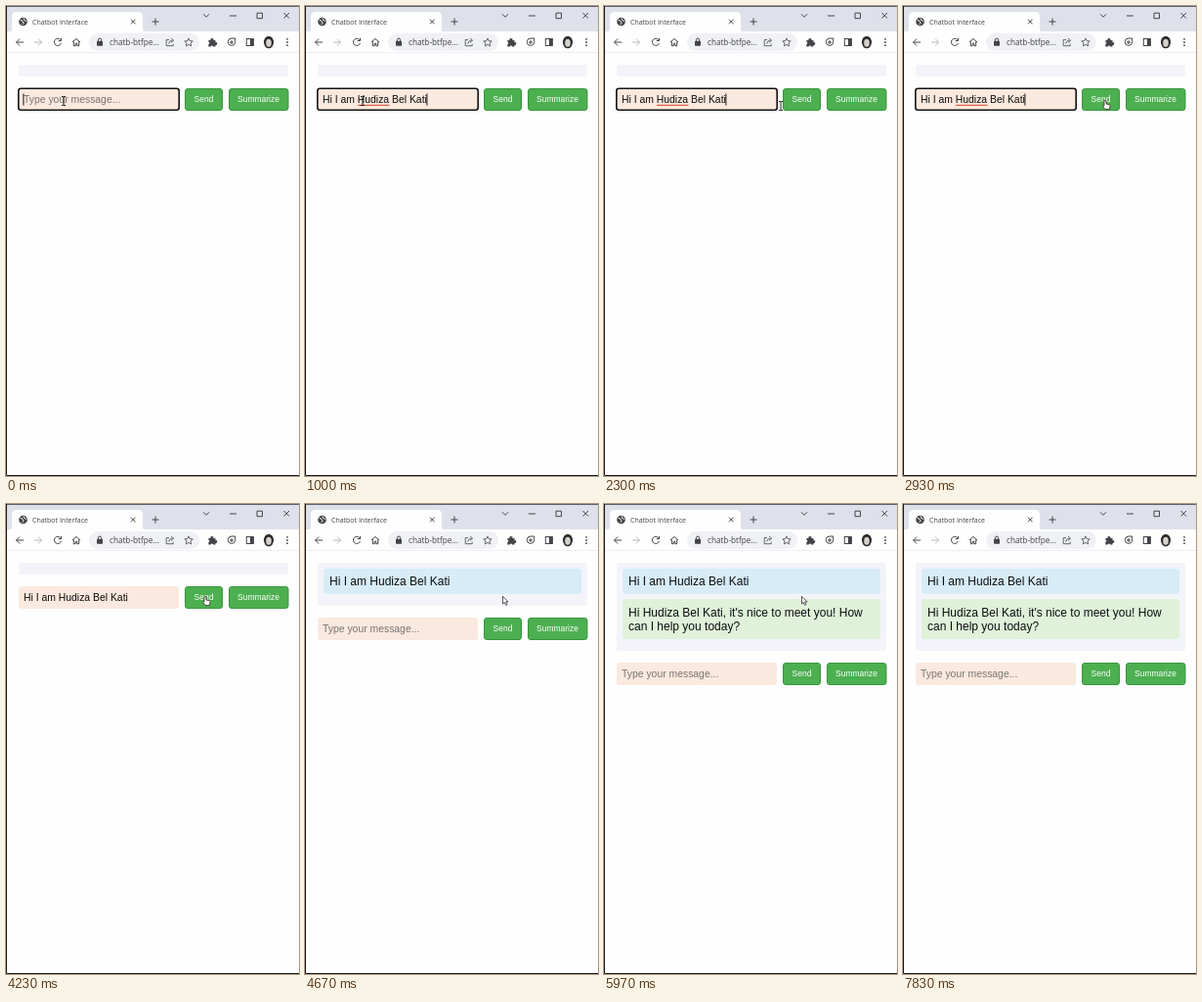
These frames come from a looping animation (300x480 px, 8 s). An HTML page:

```html
<!DOCTYPE html>
<html lang="en">
<head>
<meta charset="utf-8">
<title>Chatbot Interface</title>
<style>
html, body { margin: 0; width: 100%; height: 100%; overflow: hidden; background: #fefefe; }
svg { display: block; }
text { font-family: "Liberation Sans", Arial, sans-serif; white-space: pre; }
.ui { font-family: "Open Sans", sans-serif; fill: #434448; }
.field { font-size: 10.4px; }
.bubble text { font-size: 12px; fill: #0c0e10; }
.button text { font-size: 8.5px; fill: #fff; text-anchor: middle; }
.button rect { fill: #4caf50; stroke: #3a963f; }
.line { fill: none; stroke: #434448; stroke-width: 1; }

/* every part shares one 8 s clock */
.clip { animation: 8s step-end infinite; }
#row { animation-name: row; }
#log { animation-name: log; }
#hint { animation-name: hint; }
#typed { animation-name: typed; }
#focus { animation-name: focus; }
#spell { animation-name: spell; }
#caret { animation-name: caret; }
#sent { animation-name: sent; }
#reply { animation-name: reply; }
#beam { animation-name: beam; }
#hand { animation-name: hand; }
#arrow { animation-name: arrow; }
#mouse { animation: mouse 8s linear infinite; }

@keyframes row {
  0% { transform: translateY(0); }
  58.375% { transform: translateY(32px); }
  73.75%, 100% { transform: translateY(78px); }
}
@keyframes log {
  0% { height: 12px; }
  58.375% { height: 44px; }
  73.75%, 100% { height: 90px; }
}
@keyframes hint { 0% { opacity: 1; } 9.125% { opacity: 0; } 58.375%, 100% { opacity: 1; } }
@keyframes typed { 0% { opacity: 0; } 9.125% { opacity: 1; } 58.375%, 100% { opacity: 0; } }
@keyframes focus { 0% { opacity: 1; } 40%, 100% { opacity: 0; } }
@keyframes spell { 0% { opacity: 0; } 11.625% { opacity: 1; } 40%, 100% { opacity: 0; } }
@keyframes caret {
  0% { opacity: 1; transform: none; }
  2.125% { opacity: 0; transform: none; }
  6.25% { opacity: 1; transform: none; }
  9.125% { opacity: 1; transform: translateX(107px); }
  16% { opacity: 0; transform: translateX(107px); }
  22.875% { opacity: 1; transform: translateX(107px); }
  29.5% { opacity: 0; transform: translateX(107px); }
  36.125% { opacity: 1; transform: translateX(107px); }
  40%, 100% { opacity: 0; transform: translateX(107px); }
}
@keyframes sent { 0% { opacity: 0; } 58.375%, 100% { opacity: 1; } }
@keyframes reply { 0% { opacity: 0; } 73.75%, 100% { opacity: 1; } }
@keyframes beam { 0% { opacity: 1; } 29.2%, 100% { opacity: 0; } }
@keyframes hand { 0% { opacity: 0; } 29.2% { opacity: 1; } 58.375%, 100% { opacity: 0; } }
@keyframes arrow { 0% { opacity: 0; } 58.375% { opacity: 1; } 97.8%, 100% { opacity: 0; } }
@keyframes mouse {
  0%, 21.25% { transform: translate(59px, 97px); animation-timing-function: ease-in; }
  25% { transform: translate(116px, 98px); }
  28.75% { transform: translate(181px, 102px); }
  31.25% { transform: translate(199px, 97px); animation-timing-function: ease-out; }
  36.625%, 44.6% { transform: translate(205px, 96px); }
  46.25%, 96.5% { transform: translate(202px, 94px); }
  96.625%, 100% { transform: translate(260px, 117px); }
}
</style>
</head>
<body>
<svg width="300" height="480" viewBox="0 0 300 480">
  <rect width="300" height="480" fill="#fefefe"/>

  <!-- tab strip -->
  <rect width="300" height="27" fill="#dfe1ea"/>
  <path d="M2 27q4 0 4-4V11q0-5 5-5H135q5 0 5 5V23q0 4 4 4z" fill="#fefefe"/>
  <circle cx="17.5" cy="16" r="4.3" fill="#434448"/>
  <path d="M14.5 14l2.5 1.5 1 2-1.5 1.5M18 12.5l.5 1.8 2.2 1.2" class="line" style="stroke:#fefefe"/>
  <text class="ui" x="27" y="18.6" font-size="7">Chatbot Interface</text>
  <path class="line" d="M128 13.7l4.6 4.6M132.6 13.7l-4.6 4.6M149.5 16h7M153 12.5v7"/>
  <path class="line" d="M202 8.3l3 3 3-3M229 10h7M257 7.2h5.5v5.5H257zM284.5 7l5.5 5.5M290 7l-5.5 5.5"/>

  <!-- toolbar -->
  <rect y="26" width="300" height="21" fill="#fefefe"/>
  <rect y="47" width="300" height="1" fill="#eeeef2"/>
  <rect x="85" y="28" width="113" height="18" rx="9" fill="#f0f1f5"/>
  <path class="line" d="M18 37h-7.5M14 33.5L10.5 37l3.5 3.5"/>
  <path class="line" d="M29 37h7.5M33 33.5l3.5 3.5-3.5 3.5" style="stroke:#b8b9bd"/>
  <path class="line" d="M55.8 34.6A3.6 3.6 0 1 0 56.4 38M56.5 32.8v2.7h-2.8"/>
  <path class="line" d="M68 37l4-3.6 4 3.6M69.3 36.4v4.3h1.9v-2.5h1.6v2.5h1.9v-4.3"/>
  <rect x="93" y="35.8" width="6" height="5" rx=".7" fill="#434448"/>
  <path class="line" d="M94.4 36v-1.4a1.6 1.6 0 0 1 3.2 0V36"/>
  <text class="ui" x="106" y="40" font-size="8.2">chatb-btfpe...</text>
  <path class="line" d="M167 34.5h-2.8v6.2h7v-2M166.5 38.5q.7-3.3 4-3.3M169 33l2.6 2.2-2.6 2.2" style="stroke-width:.8"/>
  <path class="line" d="M187 32.9l1.2 2.7 3 .3-2.2 2 .6 3-2.6-1.5-2.6 1.5.6-3-2.2-2 3-.3z" style="stroke-width:.8"/>
  <path d="M207.3 35h2.2a1.5 1.5 0 1 1 2.8 0h2.2v2.2a1.4 1.4 0 1 1 0 2.7v1.6h-2.3a1.4 1.4 0 0 0-2.7 0h-2.2v-2.3a1.4 1.4 0 0 0 0-2.7z" fill="#434448"/>
  <path class="line" d="M231 33h3.7v3.8a3.7 3.7 0 1 1-3.7-3.8zM229 37h4M231 35v4"/>
  <rect class="line" x="246.3" y="33.5" width="7" height="7"/>
  <rect x="250" y="33.5" width="3.5" height="7" fill="#434448"/>
  <!-- profile silhouette -->
  <ellipse cx="269" cy="37" rx="5" ry="6.3" fill="#2c2c2e"/>
  <ellipse cx="269" cy="37.7" rx="2.8" ry="4" fill="#d6d2cc"/>
  <g fill="#434448">
    <circle cx="288" cy="33.8" r=".9"/><circle cx="288" cy="37" r=".9"/><circle cx="288" cy="40.2" r=".9"/>
  </g>

  <!-- conversation -->
  <rect id="log" class="clip" x="13" y="60" width="276" height="12" rx="2" fill="#f3f4f9"/>
  <g id="sent" class="clip bubble">
    <rect x="19" y="66" width="264" height="26" rx="3" fill="#d7ecf7"/>
    <text x="25" y="83.3">Hi I am Hudiza Bel Kati</text>
  </g>
  <g id="reply" class="clip bubble">
    <rect x="19" y="97" width="264" height="41" rx="3" fill="#dff1d9"/>
    <text x="25" y="115">Hi Hudiza Bel Kati, it's nice to meet you! How</text>
    <text x="25" y="129">can I help you today?</text>
  </g>

  <!-- message form -->
  <g id="row" class="clip">
    <rect x="13" y="84" width="164" height="23" rx="3" fill="#fae9de"/>
    <rect id="focus" class="clip" x="12.8" y="84.3" width="164.4" height="22" rx="2.5" fill="none" stroke="#141414" stroke-width="1.6"/>
    <text id="hint" class="clip field" x="18" y="99" fill="#7a7573">Type your message...</text>
    <text id="typed" class="clip field" x="18" y="99" fill="#0c0c0c">Hi I am Hudiza Bel Kati</text>
    <path id="spell" class="clip" d="M54 101.3h32.5" stroke="#d8402c"/>
    <rect id="caret" class="clip" x="17.4" y="89.5" width="1" height="12" fill="#141414"/>
    <g class="button">
      <rect x="183.5" y="84.5" width="38" height="22" rx="2.5"/>
      <text x="202.5" y="98.2">Send</text>
    </g>
    <g class="button">
      <rect x="228.5" y="84.5" width="60.5" height="22" rx="2.5"/>
      <text x="258.5" y="98.2">Summarize</text>
    </g>
  </g>

  <!-- window edges -->
  <path d="M0 .5h300" stroke="#606168"/>
  <path d="M.5 0v479.5h300" fill="none" stroke="#1c1c1e"/>

  <g id="mouse">
    <path id="beam" class="clip" d="M-2-4.5h1.5l.5.5.5-.5H2M0-4v8M-2 4.5h1.5L0 4l.5.5H2" fill="none" stroke="#141414"/>
    <path id="hand" class="clip" d="M1 1q1-1.2 2 0v3l3.3.8q.9.4.7 1.4L6.3 9.5H2L-.5 6.3q.2-1 1.5-.3z" fill="#fff" stroke="#3c2c2c" stroke-width=".8"/>
    <path id="arrow" class="clip" d="M.5.3v7.7l1.8-1.6 1.3 2.9 1.3-.6-1.3-2.8h2.5z" fill="#fff" stroke="#303034" stroke-width=".8"/>
  </g>
</svg>
</body>
</html>
```
